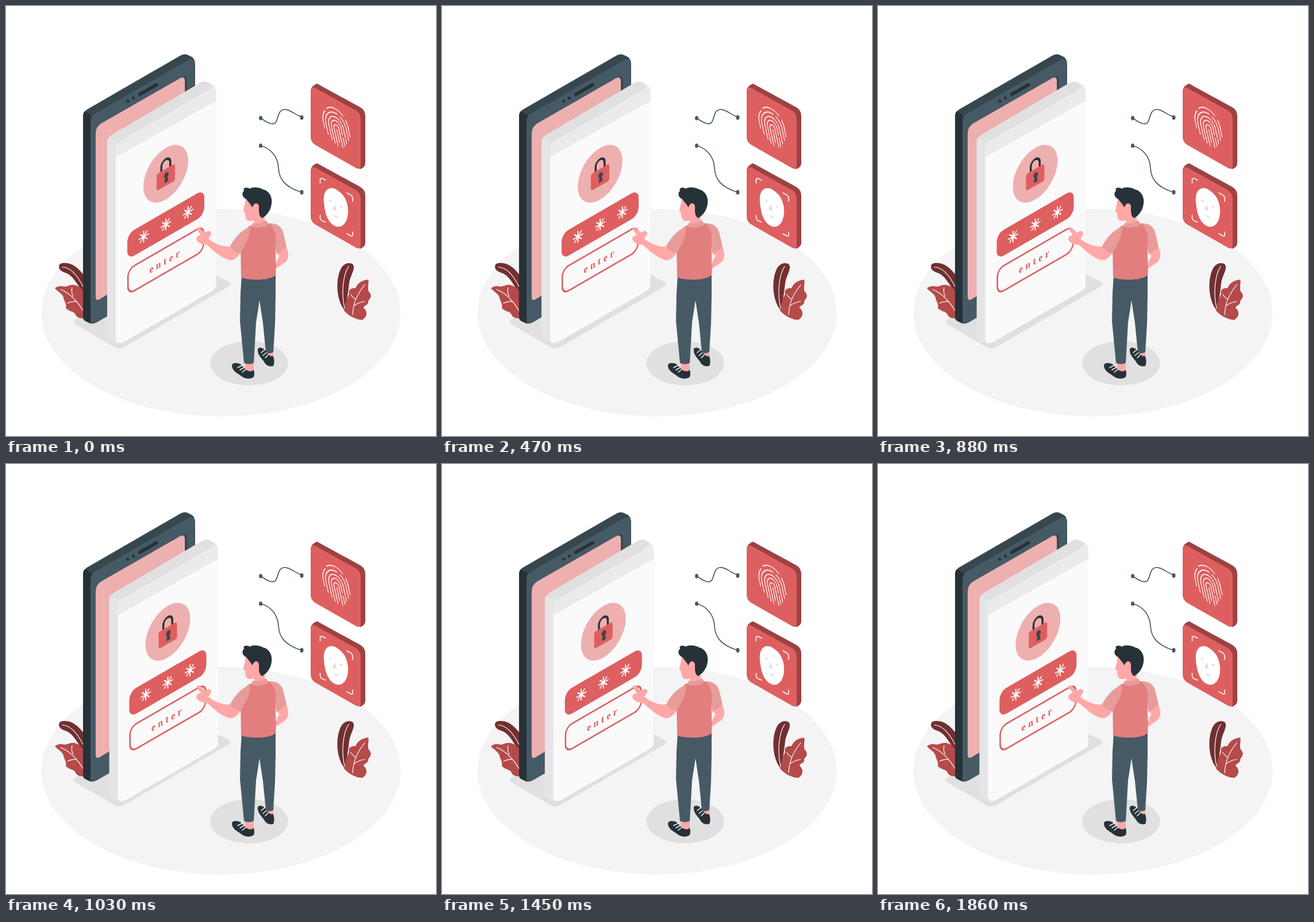
Recreate the animation shown at these times as an HTML page. Size 748 by 748 pixels, loop 1910 ms.

```html
<!DOCTYPE html>
<html lang="en">
<head>
<meta charset="utf-8">
<title>Secure login</title>
<style>
html, body { margin: 0; width: 100%; height: 100%; overflow: hidden; background: #fff }
svg { display: block; width: 100vw; height: 100vh }
.line { fill: none; stroke-linecap: round; stroke-linejoin: round }
.white { stroke: #fff; stroke-width: 1.5 }
.vein { stroke: #fff; stroke-width: 1.2 }
.ink { fill: #263238 }
.slate { fill: #455a64 }
.red { fill: #de5f5f }
.pink { fill: #eeafaf }
.skin { fill: #ffa8a7 }
.sleeve { fill: #e89c9a }
.maroon { fill: #722f31 }
.leaf { fill: #b54a4a }
</style>
</head>
<body>
<svg viewBox="0 0 748 748">
  <defs>
    <g id="card">
      <path fill="#9c4243" d="M530 147Q531 139 541 135L616 176Q625 181 625 191V274Q625 280 616 284L600 240Z"/>
      <path class="red" d="M530 149Q530 139 539 143L609 182Q617 187 617 197V278Q617 286 609 282L537 241Q530 236 530 228Z"/>
    </g>
    <path id="arm" d="M0-9.5V9.5"/>
    <g id="star" class="line" stroke="#fff" stroke-width="2.2">
      <use href="#arm"/><use href="#arm" transform="rotate(45)"/>
      <use href="#arm" transform="rotate(90)"/><use href="#arm" transform="rotate(135)"/>
    </g>
  </defs>

  <ellipse cx="374" cy="533.5" rx="312.5" ry="180.5" fill="#f4f4f4"/>
  <path fill="#e0e0e0" d="M121 545L340 455L387 480Q394 484 387 488L206 593Q197 598 188 593L121 554Q115 549 121 545Z"/>
  <ellipse cx="423" cy="621.5" rx="67.5" ry="38.5" fill="#e0e0e0"/>

  <!-- plants -->
  <path class="maroon" d="M92 454Q92 447 100 447C118 446 129 460 136 469V498C127 491 123 479 112 469C104 462 94 464 92 454Z"/>
  <path class="leaf" d="M85 491C92 485 98 488 104 488C112 485 117 484 121 486C128 487 133 494 136 498V543C127 544 122 541 120 535C117 531 108 531 104 525C106 518 101 514 100 507C98 500 90 497 85 491Z"/>
  <path class="maroon" d="M588 528C574 510 573 475 583 456C588 447 599 445 604 450C608 458 599 468 597 482C595 500 593 512 590 529Z"/>
  <path class="leaf" d="M588 530C590 515 594 508 597 501C594 493 602 490 608 491C611 483 618 477 630 476C632 482 628 490 631 497C637 502 635 508 630 513C632 520 622 521 622 525C630 532 628 541 620 546C610 546 597 540 588 530Z"/>
  <path class="line vein" d="M98 454C115 455 127 474 134 488M95 493C112 500 125 515 134 530M107 517Q116 513 122 514M115 490Q113 499 117 505M596 453C586 468 583 500 589 526M603 537C604 515 612 500 624 485M608 510Q602 506 600 502M606 521Q615 515 624 514"/>

  <!-- phone -->
  <path fill="#37474f" d="M134 192Q134 184 141 180L302 87Q309 82 316 85L324 89Q329 93 329 102V440L160 549Q150 555 144 551L138 548Q134 546 134 541Z"/>
  <path class="ink" d="M134 192Q134 186 137 183L149 190L147 200V552L138 548Q134 546 134 541Z"/>
  <path class="slate" d="M147 201Q147 192 155 187L317 94Q328 89 328.5 101V453L160 549Q147 556 147 546Z"/>
  <path class="line" stroke="#37474f" stroke-width="3" d="M306 125Q313 121 313.5 130V180"/>
  <path class="pink" d="M156 222Q156 210 166 204L304 125Q311 122 311 131V420L163 510Q156 514 156 506Z"/>
  <path class="line" stroke="#263238" stroke-width="6" d="M233 153.5L262 137"/>
  <circle class="ink" cx="212" cy="165.5" r="2.6"/>
  <circle class="ink" cx="221.5" cy="160" r="2.6"/>

  <!-- login panel -->
  <g id="panel">
    <path fill="#e0e0e0" d="M176 237Q176 229 184 224L337 134Q345 129 352 133L360 138Q365.5 142 365.5 150V484Q365.5 492 358 496L206 584Q198 589 191 586L180 580Q176 578 176 573Z"/>
    <path fill="#e5e5e5" d="M176 237Q176 232 179 229L193 237L191 247V586L180 580Q176 578 176 573Z"/>
    <path fill="#fafafa" d="M191 247Q191 239 199 235L355 145Q365.5 140 365.5 150V484Q365.5 492 358 496L206 584Q191 591 191 579Z"/>
    <path fill="#ebebeb" d="M191 263V247Q191 239 199 235L349 148Q355 144 360 138Q365.5 142 365.5 150V165Z"/>
    <g transform="matrix(.866 -.5 0 1 278 291.7)">
      <circle class="pink" r="45"/>
      <path class="line" stroke="#263238" stroke-width="4" d="M-9-6V-16A8.8 9 0 0 1 9-16V-6"/>
      <rect class="red" x="-18.5" y="-8.500" width="37" height="29.5" rx="4"/>
      <g fill="#37474f">
        <circle cx="1" cy="3" r="4.6"/>
        <path d="M-1 5L-3 15H5L3 5Z"/>
      </g>
    </g>
    <g transform="matrix(.866 -.5 0 1 278 380)">
      <rect class="red" x="-77.4" y="-22.5" width="154.8" height="45" rx="14"/>
      <use href="#star" x="-44.5" y="-1"/><use href="#star"/><use href="#star" x="44.5" y="1"/>
      <rect x="-76" y="40" width="152" height="43.5" rx="13" fill="none" stroke="#de5f5f" stroke-width="3"/>
      <text class="red" x="0" y="69" text-anchor="middle" font-family="'Liberation Serif', 'Noto Serif', serif" font-weight="700" font-size="18" letter-spacing="5.2">enter</text>
    </g>
  </g>

  <!-- connectors -->
  <path class="line" stroke="#455a64" stroke-width="1.7" d="M443 195C452 201 458 205 464 205C475 205 470 181 484 180C493 179 502 189 514 193M443 243C460 247 473 262 474 282C475 302 486 315 514 324"/>
  <g class="slate">
    <ellipse cx="443" cy="195" rx="3" ry="3.8"/><ellipse cx="514.5" cy="194" rx="3" ry="4"/>
    <ellipse cx="443" cy="243" rx="3" ry="3.8"/><ellipse cx="514.5" cy="324" rx="3" ry="4"/>
  </g>

  <!-- biometric cards -->
  <use href="#card"/>
  <use href="#card" y="138.5"/>
  <path class="line white" transform="matrix(.866 .5 0 1 574.500 211) rotate(-16)" d="M-12-28A27 30 0 0 1 20-22M-26 6V-2A27 27 0 0 1-17-23M24-16A27 28 0 0 1 26 0V10M-21 15V-2A21 22 0 0 1 8-22M13-19A21 22 0 0 1 21-2V17M-15 22V-1A15 16 0 0 1 15-1V23M-10 27V0A10 11 0 0 1 10 0V10M10 15V28M-5 30V1A5 5 0 0 1 5 1V31M0 4V24"/>
  <path class="line white" d="M546.5 308V302Q547 299 550 300L556 303M593 325L600 329Q603 331 603 334V340M546.5 364V369Q547 372 549 373L556 376M593 396L600 400Q603 401 603 399V393"/>
  <path fill="#fff" d="M553 332C554 318 566 312 577 321C590 329 596 345 595 360C594 376 586 385 577 384C568 383 560 374 556 360C554 350 552 341 553 332Z"/>
  <path fill="#dedede" d="M572 345L575 357L568 354ZM561 337L567 338L565 341ZM580 348L586 348L583 351ZM569 363L579 368L574 369Z"/>

  <!-- man -->
  <path class="skin" d="M415 615H431V636Q424 642 416 634ZM452 598H465V612Q460 617 452 607Z"/>
  <path class="ink" d="M393 625C394 620 402 620 408 623L418 633Q426 638 431 633C433 641 432 646 428 647C420 650 412 647 407 642C401 638 393 634 393 625ZM438 597C440 592 447 594 452 600Q458 611 465 609Q468 620 465 626C460 628 452 626 449 619C444 612 437 606 438 597Z"/>
  <path class="line white" d="M403 629L411 625M407 633L414 629M411 637L417 632M444 603L450 598M447 608L453 603M451 612L456 607"/>
  <path class="slate" d="M410 468L469 464L469 505L468 552L465 602Q457 606 452 602L447 552L441 512L435 550L431 621Q422 625 414 621L407 548L408 500Z"/>
  <path class="skin" d="M408 429C400 441 394 444 385 441C372 436 360 425 350 416L340 414Q332 411 331 405Q331 400 339 398L331 388Q333 383 337 386L346 394L353 391Q358 393 357 397L352 405C365 415 380 420 391 418Z"/>
  <path class="skin" d="M469 430L487 418C493 430 492 438 487 445L471 456L468 455C470 445 473 440 476 434Z"/>
  <path fill="#e27e7e" d="M423 383C432 379 450 376 462 379C472 385 473 400 470 412C467 430 471 450 469 468Q462 475 440 476Q417 476 409 472L408 412C412 395 417 387 423 383Z"/>
  <path class="sleeve" d="M425 384C412 388 398 402 390 418Q397 429 408 430L411 425C420 410 425 397 425 384ZM458 378C472 378 478 383 482 393L488 418Q482 426 470 430C467 410 475 395 458 378ZM427 384Q427 377 433 376L452 373Q457 377 455 382Q438 388 427 384Z"/>
  <path class="skin" d="M417 334C416 345 413 352 413 357L416 360C416 368 418 375 426 374L432 373L431 378Q441 379 450 374L450 338Z"/>
  <path class="ink" d="M418 336C410 333 410 324 414 322C411 315 421 315 424 318C428 314 441 315 447 319C460 322 465 336 461 349C458 360 451 366 445 369C439 364 440 356 440 351C441 343 433 341 431 346L429 351C425 344 421 340 418 336Z"/>
  <ellipse class="skin" cx="434" cy="352" rx="5.5" ry="7"/>
</svg>
<script>
const LOOP = 1910, STEPS = 37, STEP = LOOP / STEPS;
const SHAKE = 1863, LAG = 15;   // one shake cycle and its delay, ms
const UNIT = 1.496, REST = .35; // stage pixels per shake unit, resting shift

const shifts = [0, -1, 2, -4, 4, -4, 4, -4, 2, -1, 0];
const shake = document.getElementById("panel").animate(
  shifts.map(x => ({ transform: `translateX(${x * UNIT + REST}px)`, easing: "ease" })),
  { duration: SHAKE, fill: "both" });
shake.pause();

function draw() {
  const t = performance.now() % LOOP;
  const step = Math.floor((t + 3) / STEP) % STEPS || STEPS;
  shake.currentTime = (step * STEP - LAG) % SHAKE;
  requestAnimationFrame(draw);
}
draw();
</script>
</body>
</html>
```
